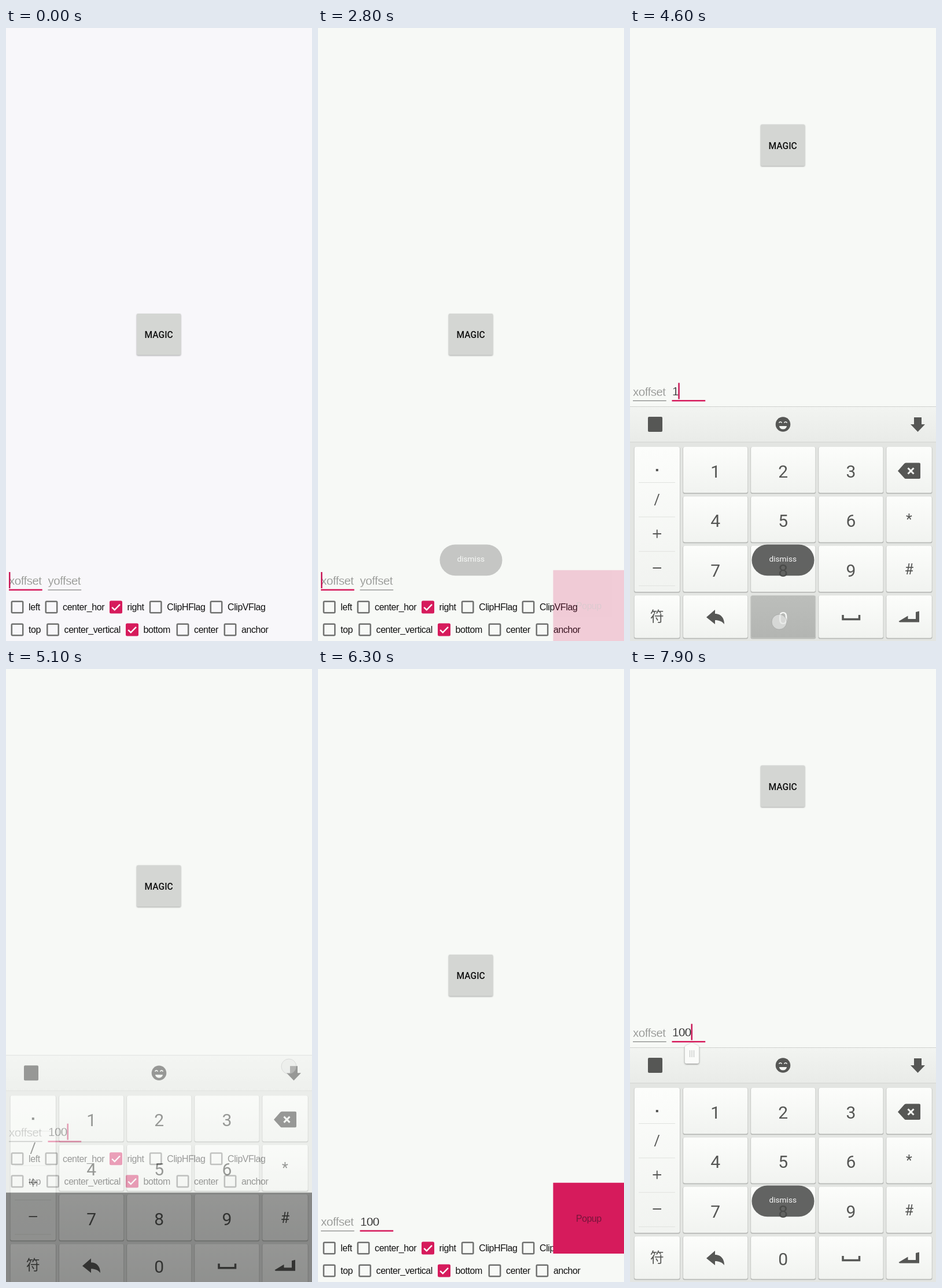
Recreate the animation shown at these times as an HTML page. Size 529 by 1058 pixels, loop 8 s.

```html
<!DOCTYPE html>
<html lang="en">
<head>
<meta charset="utf-8">
<title>Popup gravity demo</title>
<style>
  html, body { margin: 0; width: 100%; height: 100%; overflow: hidden; background: #000; }
  svg { display: block; width: 529px; height: 1058px; }
  .app { font-family: "Liberation Sans", Arial, sans-serif; font-size: 16px; letter-spacing: -.45px; fill: #111; }
  .field { font-size: 20.5px; letter-spacing: -.5px; stroke: #f7f9f6; stroke-width: .35; }
  .hint { fill: #8c8d8b; }
  .roboto { font-family: Roboto, sans-serif; text-anchor: middle; letter-spacing: 0; }
  .digit { font-size: 30px; fill: #555654; }
  .symbol { font-family: Roboto, "Noto Sans CJK SC", "Noto Sans CJK", sans-serif; text-anchor: middle; fill: #555654; }
  .icon { fill: #565755; }
  #button { filter: drop-shadow(0 1px 1.2px #0005); }
  #handle { filter: drop-shadow(0 1px 1.5px #0007); }
</style>
</head>
<body>
<svg viewBox="0 0 529 1058">
  <defs>
    <linearGradient id="keyFill" x2="0" y2="1">
      <stop stop-color="#fcfdfb"/><stop offset="1" stop-color="#f1f3f0"/>
    </linearGradient>
    <linearGradient id="barFill" x2="0" y2="1">
      <stop stop-color="#f2f4f1"/><stop offset="1" stop-color="#e9ebe8"/>
    </linearGradient>
    <linearGradient id="downFill" x2="0" y2="1">
      <stop stop-color="#bcbebb"/><stop offset="1" stop-color="#b3b5b2"/>
    </linearGradient>
  </defs>

  <g id="page" class="app">
    <rect id="paper" width="529" height="1058"/>
    <rect id="button" x="226" y="493" width="76.2" height="71.5" rx="2" fill="#d4d6d3"/>
    <rect id="press" x="226" y="493" width="76.2" height="71.5" rx="2" fill="#000"/>
    <text class="roboto" x="264.2" y="535.2" font-size="15.6" font-weight="500">MAGIC</text>
    <g class="field">
      <text class="hint" x="5" y="961">xoffset</text>
      <text id="hintY" class="hint" x="72.5" y="961">yoffset</text>
      <text id="value" x="73" y="960.5"></text>
    </g>
    <path id="lineX" d="M5 969.8h57.700"/>
    <path id="lineY" d="M72.500 969.8h57.700"/>
    <g id="boxes"></g>
    <rect id="caret" y="939" width="2.500" height="28" fill="#c91958"/>
  </g>

  <g id="popup" class="app">
    <rect x="406.500" y="935.700" width="122.500" height="122.300" fill="#d61b5c"/>
    <text x="446" y="1003" style="fill:#76153a">Popup</text>
  </g>

  <g id="keyboard">
    <rect y="653" width="529" height="440" fill="#e3e5e2"/>
    <rect y="653" width="529" height="62" fill="url(#barFill)"/>
    <path d="M0 653.500H529M0 714.800H529" stroke="#d0d2cf"/>
    <g id="keys"></g>
    <g class="icon">
      <rect x="31" y="671" width="25" height="26" rx="2"/>
      <circle cx="264.500" cy="684" r="12.800"/>
      <path d="M491 672h13v12h6l-12.500 13L485 684h6z"/>
      <path d="M463 764.500L474 752q1-1.500 3-1.500H500q2 0 2 2V776q0 2-2 2H477q-2 0-3-1.500z"/>
      <path d="M132 1017L147 1004v7c10 0 16 7 16 18-4-5-9-7-16-7v7z"/>
      <path d="M464.500 1024L480.500 1014.500v5.500H494v-12l6-1.500v19H466z"/>
    </g>
    <g fill="none" stroke="#f3f5f2">
      <path d="M480.500 759.500l10 10m0-10l-10 10" stroke-width="3"/>
      <path d="M257.500 681.500q2.500-3.500 5 0m4 0q2.500-3.500 5 0" stroke-width="1.700"/>
      <path d="M258 687h13a6.500 5.500 0 0 1-13 0z" fill="#f3f5f2" stroke="none"/>
    </g>
    <path d="M368 1013v7.500H396.500V1013" fill="none" stroke="#565755" stroke-width="3.500"/>
    <g id="down1"></g>
    <g id="down0"></g>
  </g>

  <g id="handle">
    <path d="M94.700 653q0-2 2-3L107 645l10.300 5q2 1 2 3v25q0 3-3 3H97.700q-3 0-3-3z" fill="#fafbf9"/>
    <path d="M103.500 658v12m3.500-12v12m3.500-12v12" stroke="#c9cbc8" stroke-width="1.300"/>
  </g>

  <g id="toast">
    <rect x="210.500" y="891.500" width="108" height="53.700" rx="26.800" fill="#484948" fill-opacity=".85"/>
    <text class="roboto" x="264.300" y="921" font-size="13.700" fill="#f7f7f7">dismiss</text>
  </g>

  <circle id="touch" r="13" fill="#e4e5e4" fill-opacity=".7" stroke="#8b8d8a" stroke-opacity=".45"/>
</svg>

<script>
const LOOP = 8000, TICK = 100, BLINK = 500;
const LIFT = 326.5;
const PINK = '#d61b5c';
const $ = id => document.getElementById(id);

// Check boxes
const checkBox = (x, y, label) => (/right|bottom/.test(label)
  ? `<rect x="${x - 11}" y="${y - 11}" width="22" height="22" rx="2.5" fill="${PINK}"/>
     <path d="M${x - 6.8} ${y + .3}l4.600 4.600 9.200-9.600" fill="none" stroke="#fff" stroke-width="2.400"/>`
  : `<rect x="${x - 9.7}" y="${y - 9.7}" width="19.4" height="19.4" rx="1.5" fill="none" stroke="#717271" stroke-width="2.500"/>`)
  + `<text x="${x + 19.6}" y="${y + 5.7}">${label}</text>`;

const rows = [
  { left: 19.5, center_hor: 78.5, right: 190, ClipHFlag: 258.7, ClipVFlag: 363.5 },
  { top: 19.5, center_vertical: 81, bottom: 218, center: 305.5, anchor: 387.5 }
];
$('boxes').innerHTML = rows.map((row, i) => Object.entries(row)
  .map(([label, x]) => checkBox(x, 999.5 + 39 * i, label)).join('')).join('');

// Number pad: outer columns are narrower, the last row is lower
const cell = (col, row) => ({
  x: col ? 92 + 117.1 * (col - 1) : 7.5, y: 723 + 85.4 * row,
  w: col % 4 ? 111.4 : 78.5, h: row < 3 ? 79.2 : 73.5
});
const plate = ({ x, y, w, h }, fill) =>
  `<rect x="${x}" y="${y}" width="${w}" height="${h}" rx="3" fill="${fill}"/>`;
const key = ({ x, y, w, h }) =>
  plate({ x: x - .7, y: y + .3, w: w + 1.4, h: h + 1.4 }, '#b9bbb8') + plate({ x, y, w, h }, 'url(#keyFill)');
const digit = (n, { x, y, w, h }, style = '') =>
  `<text class="roboto digit" x="${x + w / 2}" y="${y + h / 2 + 13.3}" style="${style}">${n}</text>`;
const symbol = (c, x, y, size = 25) =>
  `<text class="symbol" x="${x}" y="${y}" font-size="${size}">${c}</text>`;
const digitCell = n => n ? cell((n - 1) % 3 + 1, Math.floor((n - 1) / 3)) : cell(2, 3);

let pad = key({ ...cell(0, 0), h: 250 });
for (let row = 0; row < 4; row++)
  for (let col = row < 3 ? 1 : 0; col < 5; col++) pad += key(cell(col, row));
for (let n = 0; n < 10; n++) pad += digit(n, digitCell(n));
for (let i = 0; i < 4; i++) pad += `<path d="M15 ${784.5 + 59.4 * i}h63" stroke="#e0e2df"/>`;
$('keys').innerHTML = pad
  + symbol('/', 46.7, 823) + symbol('符', 46.7, 1024, 24) + symbol('*', 482.5, 857) + symbol('#', 482.5, 943)
  + '<path d="M39.500 873h14.500m-7.250-7.250v14.500M39.500 932h14.500" stroke="#555654" stroke-width="1.800"/>'
  + '<rect x="44.800" y="761" width="4" height="4" fill="#555654"/>';

for (const n of [0, 1])
  $('down' + n).innerHTML = plate(digitCell(n), 'url(#downFill)') + digit(n, digitCell(n), 'fill:#f6f7f5');

// The user's taps drive everything else
const spots = { button: [264, 530], field: [117, 955], 1: [150, 765], 0: [258, 1025], hide: [489, 686] };
const taps = [
  [1000, 'button'], [3100, 'field'], [4300, '1'], [4600, '0'], [4700, '0'],
  [4900, 'hide'], [5500, 'button'], [6800, 'field']
];
const FOCUS = 3200;

const ramp = (t, start, length) => Math.min(1, Math.max(0, (t - start) / length));
const easeOut = x => 1 - (1 - x) ** 2;
const pulse = (t, from, to, length) => ramp(t, from, length) - ramp(t, to, length);

const keyboardOpen = t => easeOut(ramp(t, 3110, 360)) - easeOut(ramp(t, 5000, 320)) + easeOut(ramp(t, 6900, 360));
const shift = (id, x, y) => $(id).setAttribute('transform', `translate(${x} ${y})`);
const fade = (id, opacity) => $(id).setAttribute('opacity', opacity);

function underline(id, focused) {
  $(id).setAttribute('stroke', focused ? PINK : '#858685');
  $(id).setAttribute('stroke-width', focused ? 2.4 : 1.3);
}

function draw(t) {
  const open = keyboardOpen(t);
  $('paper').setAttribute('fill', t < 200 ? '#f8f7fa' : '#f7f9f6');
  shift('page', 0, -LIFT * open);
  shift('keyboard', 0, 25 * (1 - open));
  fade('keyboard', open ** .7);

  fade('popup', pulse(t, 1200, 2600, 250) + pulse(t, 5600, 6800, 250));
  shift('popup', 0, t < 5000 ? 0 : -49);
  fade('toast', pulse(t, 2700, 4700, 300) + ramp(t, 6900, 300));

  const [tapTime, target] = taps.filter(tap => tap[0] <= t).pop() || [-LOOP, 'button'];
  const glow = 1 - ramp(t, tapTime, 400);
  shift('touch', ...spots[target]);
  fade('touch', glow);
  fade('press', target === 'button' ? .1 * glow : 0);
  for (const n of [0, 1]) fade('down' + n, target === String(n) && t < tapTime + TICK ? 1 : 0);

  // A digit is entered when its key is released
  const strokes = taps.filter(([time, name]) => /\d/.test(name) && time + TICK <= t);
  const focusY = t >= FOCUS;
  $('value').textContent = strokes.map(tap => tap[1]).join('');
  fade('hintY', strokes.length ? 0 : 1);
  underline('lineX', !focusY);
  underline('lineY', focusY);

  // Blinking restarts with each focus change or stroke
  const restart = strokes.length ? strokes.pop()[0] + TICK : focusY ? FOCUS : -300;
  fade('caret', Math.floor((t - restart) / BLINK) % 2 ? 0 : 1);
  shift('caret', focusY ? 72.2 + 11.1 * $('value').textContent.length : 5, 0);

  fade('handle', t >= 7000 ? 1 : 0);
  shift('handle', 0, LIFT * (1 - keyboardOpen(t - TICK)));
}

function frame(now) {
  draw(Math.floor(now % LOOP / TICK) * TICK);
  requestAnimationFrame(frame);
}
draw(0);
requestAnimationFrame(frame);
</script>
</body>
</html>
```
